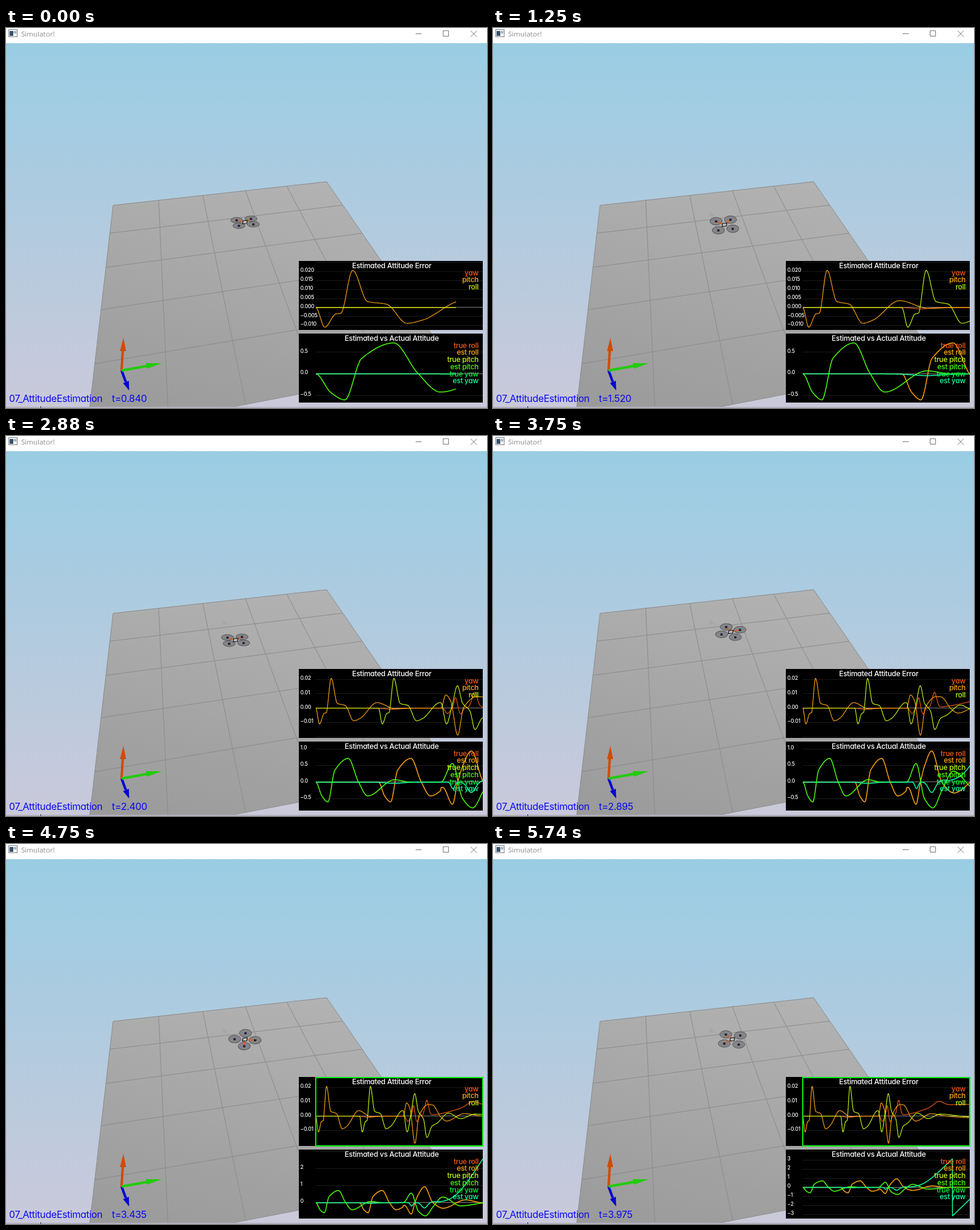
Recreate the animation shown at these times as an HTML page. Size 795 by 628 pixels, loop 5870 ms.

```html
<!DOCTYPE html>
<html lang="en">
<head>
<meta charset="utf-8">
<title>Simulator!</title>
<style>
  html, body { margin: 0; width: 100%; height: 100%; overflow: hidden; background: #fff; }
  svg { display: block; width: 795px; height: 628px; }
  text { font-family: Inter, "Open Sans", sans-serif; font-feature-settings: "cv11"; }
  .bar { font: 11.6px "Open Sans", "Noto Sans", sans-serif; fill: #8c8c8c; }
  .status { font-size: 16px; letter-spacing: -.35px; fill: #0a0aee; }
  .title { font-size: 12px; font-weight: 500; letter-spacing: -.25px; fill: #fff; text-anchor: middle; }
  .tick { font-size: 8.6px; font-weight: 500; letter-spacing: -.25px; fill: #fff; }
  .legend { font-size: 12px; font-weight: 500; letter-spacing: -.3px; text-anchor: end; }
  .grid { stroke: #1b1b1b; }
  .zero { stroke: #808080; }
  .curve { fill: none; stroke-linejoin: round; }
</style>
</head>
<body>
<svg viewBox="0 0 795 628">
  <defs>
    <linearGradient id="sky" x1="0" y1="0" x2="0" y2="1">
      <stop offset="0" stop-color="#99cde4"/><stop offset="1" stop-color="#cac9da"/>
    </linearGradient>
    <linearGradient id="floor" x1=".7" y1="0" x2=".3" y2="1">
      <stop offset="0" stop-color="#b3b3b3"/><stop offset="1" stop-color="#9a9a9a"/>
    </linearGradient>
  </defs>

  <rect width="795" height="25" fill="#fff"/>
  <rect x="4.5" y="2.5" width="14" height="12" fill="#f2f2f2" stroke="#7f8389"/>
  <rect x="6" y="5" width="6" height="8" fill="#39506e"/>
  <rect x="13" y="5" width="4" height="4" fill="#9fb4c8"/>
  <text class="bar" x="25" y="14">Simulator!</text>
  <path d="M677 9.500h10M722.500 4.500h9v9h-9zM768 4.500l10 10m0-10l-10 10" fill="none" stroke="#777"/>

  <rect y="25" width="795" height="601" fill="url(#sky)"/>
  <path id="ground" fill="url(#floor)"/>
  <path id="tiles" fill="none" stroke="#8b8b8b"/>
  <path id="ghost" d="M357 305l5 1 5 5-6 1-4-2z" fill="#a4a4a8" opacity=".6"/>
  <g id="drone"></g>

  <g stroke-width="4">
    <path d="M191 566L193 533" stroke="#d14a00"/><path d="M188.500 534h10L194 512z" fill="#d14a00"/>
    <path d="M191 566L198 585" stroke="#0000d4"/><path d="M193.500 587L203 583L203.500 599z" fill="#0000d4"/>
    <path d="M191 566L233 558.500" stroke="#20cc08"/><path d="M231 554L233 563L257 554z" fill="#20cc08"/>
  </g>
  <text class="status" x="5" y="617.500">07_AttitudeEstimation</text>
  <text class="status" id="clock" x="175" y="617.500"></text>
  <rect y="626" width="795" height="2" fill="#b4b4c0"/>
  <rect x="57" y="625" width="1" height="3" fill="#333"/>

  <g id="errorPlot"></g>
  <g id="attitudePlot"></g>
</svg>

<script>
const LOOP = 5870, STEP = 125, LAST = 46, DT = 5, END = 3975;
const $ = id => document.getElementById(id);

// Monotone cubic through a few [x, y] key points; flat at every peak and valley.
function track(...keys) {
  const last = keys.length - 1;
  const slope = i => (keys[i + 1][1] - keys[i][1]) / (keys[i + 1][0] - keys[i][0]);
  const tangent = i => {
    if (i === 0 || i === last) return 0;
    const a = slope(i - 1), b = slope(i);
    return a * b <= 0 ? 0 : 2 * a * b / (a + b);
  };
  return x => {
    let i = 0;
    while (i < last - 1 && x > keys[i + 1][0]) i++;
    const [x0, y0] = keys[i], [x1, y1] = keys[i + 1], h = x1 - x0;
    const u = Math.min(1, Math.max(0, (x - x0) / h)), v = 1 - u;
    return (1 + 2 * u) * v * v * y0 + u * v * v * h * tangent(i)
      + u * u * (3 - 2 * u) * y1 - u * u * v * h * tangent(i + 1);
  };
}
const bump = (t, center, width, height) => height * Math.exp(-(((t - center) / width) ** 2));
const softplus = (t, start, width, rate) => rate * width * Math.log1p(Math.exp((t - start) / width));

// Pitch is kicked first, roll answers with the same response, then both mix.
// Times are in ms, errors in 1e-4 rad, attitudes in 1e-2 rad.
const ROLL_DELAY = 902, MIX = 1800;
const errorKick = track([0, 0], [54, -110], [120, -36], [150, -32], [221, 207], [310, 33],
  [425, 18], [545, -88], [640, -70], [881, 38], [1145, -5], [1390, 0]);
const tiltKick = track([0, 0], [90, -43], [174, -60], [275, 36], [467, 71.5], [610, 2],
  [746, -42], [1130, 7], [1350, 0]);
const joined = (kick, delay, mix) => t => t < MIX ? kick(t - delay) : mix(t);

const pitchError = joined(errorKick, 0, track([MIX, 0], [1868, 92], [1940, 48], [2040, -188],
  [2125, 5], [2310, 80], [2400, 78], [2570, -4], [2690, -34], [3050, 17], [3435, 0], [END, -10]));
const rollError = joined(errorKick, ROLL_DELAY, track([MIX, 36], [1878, -110], [1960, 20], [2036, 156],
  [2110, 35], [2215, -20], [2287, -148], [2390, -70], [2497, -48], [2730, 21], [2980, -17], [3270, 14], [END, -4]));
const yawError = t => bump(t, 1080, 110, -8) + bump(t, 1895, 45, -38) + bump(t, 2010, 30, 72)
  + bump(t, 2085, 35, -42) + bump(t, 2283, 52, 105) + bump(t, 3230, 150, 32)
  + 82 / (1 + Math.exp((2850 - t) / 210));

const pitch = joined(tiltKick, 0, track([MIX, 0], [1965, 56], [2110, -50], [2256, -78],
  [2420, -22], [2610, 33], [2980, -19], [3600, 2], [END, 0]));
const roll = joined(tiltKick, ROLL_DELAY, track([MIX, -17], [1825, -16], [1965, -67], [2035, -5],
  [2110, 48], [2235, 94], [2413, -1], [2620, -33], [3080, 16], [3435, -1], [END, 0]));
const yaw = t => softplus(t, 2859, 130, .446) + bump(t, 1130, 180, -4)
  + bump(t, 1972, 38, -20) + bump(t, 2235, 80, -32) + bump(t, 2430, 70, 4);

const simTime = tick => tick < 23 ? 840 + tick * 67.85
  : tick < 30 ? 2400 + (tick - 23) * 70.7 : 2895 + (tick - 30) * 67.5;
const droneX = track([840, 395], [1260, 372], [1520, 382.5], [1900, 390], [2400, 379.5], [2895, 393], [END, 395.5]);
const droneY = track([840, 321], [1150, 316], [1520, 325.5], [1900, 319], [2400, 337.5], [2895, 324], [END, 323]);

const wrap = a => a > Math.PI ? a - 2 * Math.PI : a;
const series = (curve, color, unit) => ({
  color,
  values: Array.from({ length: END / DT + 1 }, (_, i) => wrap(curve(i * DT) * unit))
});
const RED = '#f05a10', ORANGE = '#ffa410', LIME = '#c4f812', GREEN = '#4cff08',
  EMERALD = '#08f040', AQUA = '#10ffa0';

const errorPlot = {
  node: $('errorPlot'), top: 385, title: 'Estimated Attitude Error', width: 1.15,
  legend: [['yaw', RED], ['pitch', ORANGE], ['roll', LIME]],
  series: [series(yawError, RED, 1e-4), series(pitchError, ORANGE, 1e-4), series(rollError, LIME, 1e-4)]
};
const attitudePlot = {
  node: $('attitudePlot'), top: 505, title: 'Estimated vs Actual Attitude', width: 1.5,
  legend: [['true roll', RED], ['est roll', ORANGE], ['true pitch', LIME], ['est pitch', GREEN],
    ['true yaw', EMERALD], ['est yaw', AQUA]],
  series: [series(roll, ORANGE, .01), series(pitch, GREEN, .01), series(yaw, AQUA, .01)]
};

const LEFT = 484, AXIS = 512, RIGHT = 788, HEIGHT = 114;

function tickStep(range) {
  for (let unit = .001; ; unit *= 10)
    for (const step of [unit, 5 * unit]) if (range / step < 6.5) return step;
}

function drawPlot(plot, t, passed) {
  const { top, legend } = plot, bottom = top + HEIGHT;
  const shown = plot.series.map(s => ({ color: s.color, values: s.values.slice(0, t / DT + 1) }));
  const all = shown.flatMap(s => s.values);
  const max = Math.max(...all), min = Math.min(...all);
  const scale = (HEIGHT - 20) / (max - min);
  const y = v => top + 15.5 + (max - v) * scale;
  const x = i => AXIS + i * DT / Math.max(1000, t) * (RIGHT - AXIS);

  let out = `<rect x="${LEFT}" y="${top}" width="${RIGHT - LEFT}" height="${HEIGHT}"/>`;
  const step = tickStep(max - min);
  const digits = Math.max(0, -Math.floor(Math.log10(step * 1.0001)));
  for (let k = -8; k <= 8; k++) {
    const at = y(k * step);
    if (at < top + 1 || at > bottom - 1) continue;
    out += `<path class="${k ? 'grid' : 'zero'}" d="M${AXIS} ${Math.floor(at) + .5}H${RIGHT}"/>`;
    if (at < top + 8 || at > bottom - 6) continue;
    const label = (k < 0 ? '\u2212' : '') + Math.abs(k * step).toFixed(digits);
    out += `<text class="tick" x="486.5" y="${at + .8}">${label}</text>`;
  }
  for (const s of shown) {
    const d = s.values.map((v, i) => x(i).toFixed(1) + ' ' + y(v).toFixed(1)).join('L');
    out += `<path class="curve" stroke="${s.color}" stroke-width="${plot.width}" d="M${d}"/>`;
  }
  out += `<text class="title" x="637.5" y="${top + 12}">${plot.title}</text>`;
  legend.forEach(([name, color], i) => {
    out += `<text class="legend" x="781" y="${top + 23.5 + i * 11.75}" fill="${color}">${name}</text>`;
  });
  if (passed)
    out += `<rect x="${AXIS}" y="${top + 1}" width="${RIGHT - AXIS}" height="${HEIGHT - 1}" fill="none" stroke="#00f010" stroke-width="2"/>`;
  plot.node.innerHTML = out;
}

function drawDrone(t) {
  const cx = droneX(t), cy = droneY(t);
  const sr = Math.sin(roll(t) / 100), sp = Math.sin(pitch(t) / 100);
  const heading = yaw(t) / 100 - .157;
  const rotors = [-3, -1, 1, 3].map(q => {
    const body = q * Math.PI / 4, a = body + heading;
    return {
      x: cx + 17 * Math.cos(a),
      y: cy + 10.7 * Math.sin(a) + 12 * (sr * Math.cos(body) + sp * Math.sin(body)),
      front: q < 0
    };
  });
  const ry = Math.min(7.5, Math.max(3, 6.2 + 5 * sp * Math.cos(heading)));
  const lean = Math.atan(.6 * sr) * 180 / Math.PI;
  let out = '';
  for (const r of rotors)
    out += `<ellipse rx="10" ry="${ry}" transform="translate(${r.x} ${r.y}) rotate(${lean})" fill="#858587" stroke="#58585a"/>`;
  for (const r of rotors)
    out += `<path d="M${cx} ${cy}L${r.x} ${r.y}" stroke="${r.front ? '#d8601c' : '#88888a'}" stroke-width="${r.front ? 1.8 : 1}"/>`;
  for (const r of rotors)
    out += `<rect x="${r.x - 1.8}" y="${r.y - 1.5}" width="3.6" height="3.4" fill="#15151c"/><rect x="${r.x - .3}" y="${r.y - 1}" width="1.4" height="1.6" fill="#2438b8"/>`;
  out += `<path d="M${cx - 3} ${cy - 2.5}l7-.5-1 5-7 .5z" fill="#b9bcc0" stroke="#17171a" stroke-width="1.2"/>`;
  $('drone').innerHTML = out;
}

// Perspective map of the unit square onto the corners a, b, c, d.
function perspective([ax, ay], [bx, by], [cx, cy], [dx, dy]) {
  const sx = ax - bx + cx - dx, sy = ay - by + cy - dy;
  const ux = bx - cx, uy = by - cy, vx = dx - cx, vy = dy - cy;
  const det = ux * vy - vx * uy;
  const g = (sx * vy - vx * sy) / det, h = (ux * sy - sx * uy) / det;
  return (u, v) => {
    const w = 1 + g * u + h * v;
    return [(ax + u * (bx - ax + g * bx) + v * (dx - ax + h * dx)) / w,
      (ay + u * (by - ay + g * by) + v * (dy - ay + h * dy)) / w];
  };
}

function drawFloor() {
  const corners = [[177, 293], [530, 254], [738, 556], [133, 673]];
  const at = perspective(...corners);
  let lines = '';
  for (let i = 0; i <= 5; i++) {
    const s = i / 5;
    lines += `M${at(s, 0)}L${at(s, 1)}M${at(0, s)}L${at(1, s)}`;
  }
  $('ground').setAttribute('d', `M${corners.join('L')}Z`);
  $('tiles').setAttribute('d', lines);
}

const start = performance.now();
let current = -1;
function render() {
  const ms = (performance.now() - start) % LOOP;
  const tick = Math.min(LAST, Math.floor((ms + 10) / STEP));
  if (tick !== current) {
    current = tick;
    const t = Math.round(simTime(tick) / DT) * DT;
    $('clock').textContent = 't=' + (t / 1000).toFixed(3);
    $('ghost').style.display = t > 1300 ? '' : 'none';
    drawDrone(t);
    drawPlot(errorPlot, t, t >= 3000);
    drawPlot(attitudePlot, t, false);
  }
  requestAnimationFrame(render);
}
drawFloor();
render();
</script>
</body>
</html>
```
